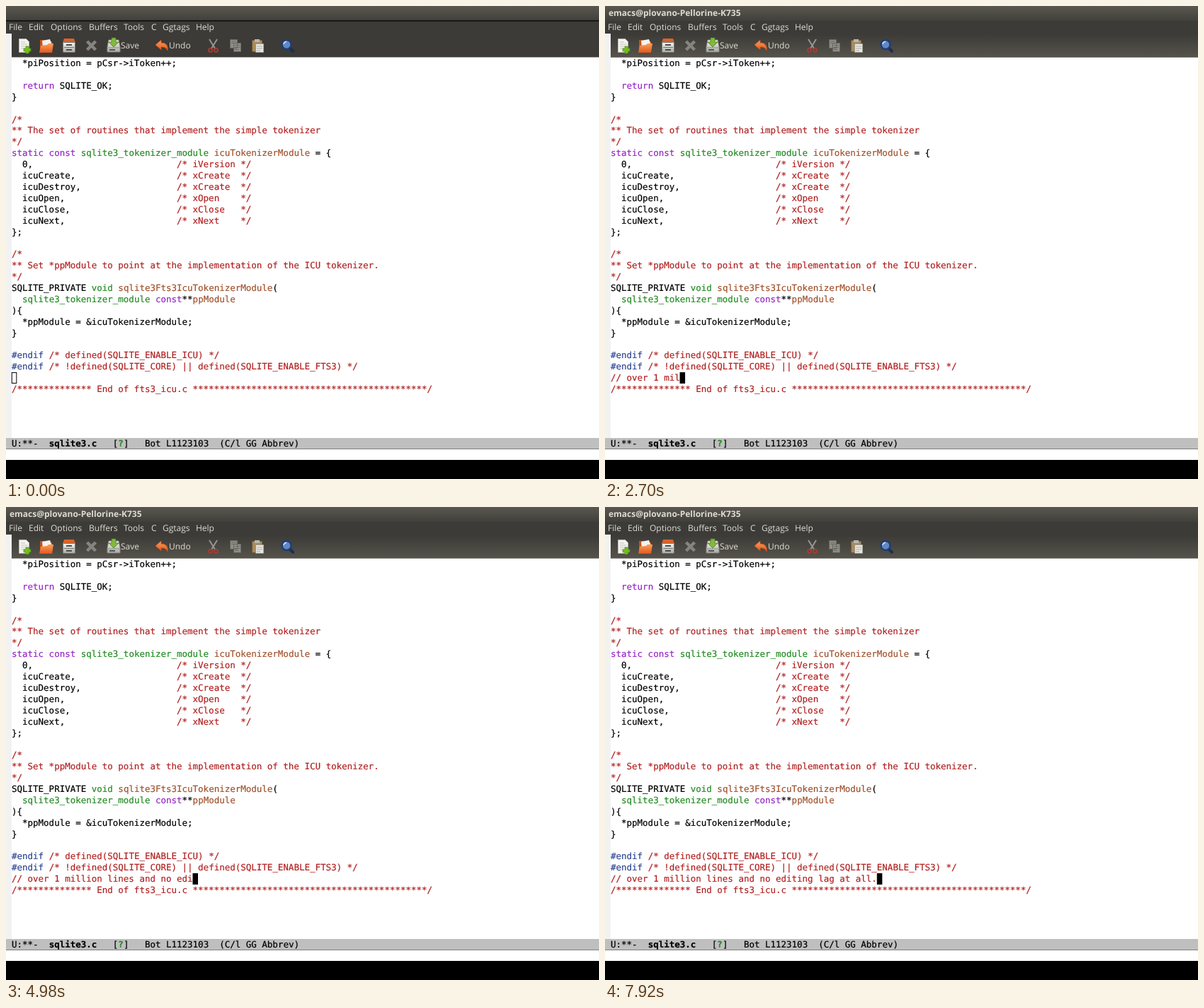
Write an HTML page that moves like this. It is 837 px wide and 669 px high and loops after 8000 ms.

```html
<!DOCTYPE html>
<html lang="en">
<head>
<meta charset="utf-8">
<title>Typing in an editor</title>
<style>
  html, body { margin: 0; width: 100%; height: 100%; overflow: hidden; background: #fff; }
  svg { display: block; width: 837px; height: 669px; }
  text { white-space: pre; text-rendering: geometricPrecision; }
  .ui { font: 12px "Open Sans", "Noto Sans", sans-serif; fill: #dfdbd2; }
  #title { font-weight: 700; }
  .code { font: 12.49px "DejaVu Sans Mono", monospace; }
  .code, .code tspan { fill: var(--ink, #000); stroke: var(--ink, #000); stroke-width: .2px; }
  .code .c { --ink: #b22222; }
  .code .k { --ink: #9628c4; }
  .code .t { --ink: #228b22; }
  .code .v { --ink: #a0522d; }
  .code .p { --ink: #2c4592; }
  .code .b { font-weight: bold; }
  .code .q { --ink: #228b22; font-weight: bold; }
</style>
</head>
<body>
<svg viewBox="0 0 837 669">
  <defs>
    <linearGradient id="panel" x2="0" y2="1"><stop stop-color="#5a5850"/><stop offset="1" stop-color="#403f3a"/></linearGradient>
    <linearGradient id="toolbar" x2="0" y2="1"><stop stop-color="#3c3b37"/><stop offset="1" stop-color="#55534b"/></linearGradient>
    <linearGradient id="orange" x2="0" y2="1"><stop stop-color="#f9a05c"/><stop offset="1" stop-color="#e4571b"/></linearGradient>
    <linearGradient id="metal" x2="0" y2="1"><stop stop-color="#f4f4f2"/><stop offset="1" stop-color="#a9a9a5"/></linearGradient>
  </defs>

  <rect width="837" height="72.500" fill="#3c3b37"/>
  <rect width="837" height="21" fill="url(#panel)"/>
  <rect id="shadow" y="20" width="837" height="2" fill="#171714"/>
  <rect id="focused" y="40" width="837" height="32.500" fill="url(#toolbar)"/>
  <text id="title" class="ui" x="5" y="14">emacs@plovano-Pellorine-K735</text>
  <g id="menu" class="ui"></g>
  <rect y="39" width="8" height="572" fill="#f2f2f2"/>

  <!-- new, open, drawer, close -->
  <path d="M18.500 46.500h10l4 4v15h-14z" fill="#f3f3ef" stroke="#b5b5ae"/>
  <path d="M21 51h6m-6 3h9m-9 3h9m-9 3h6" stroke="#c6c6c0"/>
  <path d="M28 57h4v3h3v4h-3v3h-4v-3h-3v-4h3z" fill="#73c01e" stroke="#4e8c10" stroke-width=".7"/>
  <path d="M48 65V48h7l2 2h8v15z" fill="#c8501c"/>
  <path d="M51 49l11-2 3 8-13 4z" fill="#f5f2ec"/>
  <path d="M47 66l2-10 9-1 2-2h7l-2 13z" fill="url(#orange)"/>
  <path d="M82 46h14l2 6H80z" fill="#d9632b"/>
  <rect x="80.500" y="51.500" width="17" height="14" rx="1" fill="url(#metal)" stroke="#777771"/>
  <path d="M82 58.500h14" stroke="#777771"/>
  <path d="M85 55h8m-8 7h8" stroke="#4b4b47" stroke-width="2"/>
  <path d="M114.500 50l12 12m0-12l-12 12" stroke="#85847e" stroke-width="4.500"/>

  <!-- save, undo -->
  <path d="M145 48h14l2 10v7h-18v-7z" fill="url(#metal)" stroke="#86867f"/>
  <path d="M144 59h16" stroke="#8b8b85"/>
  <path d="M146 62h8" stroke="#55554f" stroke-width="2"/>
  <path d="M149 45h6v6h4l-7 7-7-7h4z" fill="#82b93c" stroke="#4f7d1b" stroke-width=".8"/>
  <path d="M211 55l8-7v4c7 0 10 4 9 11-2-4-4-5-9-5v4z" fill="url(#orange)" stroke="#c94e18" stroke-width=".8"/>

  <!-- cut, copy, paste, search -->
  <path d="M287 47l8 13m3-13l-8 13" stroke="#96958f" stroke-width="2"/>
  <g fill="none" stroke="#a83a32" stroke-width="2"><circle cx="288.500" cy="62.500" r="2.500"/><circle cx="296.500" cy="62.500" r="2.500"/></g>
  <path d="M316.500 47.500h10v12h-10zM321.500 52.500h10v12h-10z" fill="#8e8d86" stroke="#66655f"/>
  <path d="M318 50h7m-7 2.500h3m2 3h7m-7 3h7m-7 3h5" stroke="#6d6c66"/>
  <rect x="347.500" y="48.500" width="14" height="16" rx="1" fill="#a88a5c" stroke="#76613f"/>
  <path d="M351 47h7v4h-7z" fill="#b8b7b0"/>
  <path d="M352.500 53.500h11v12h-11z" fill="#e8e7e1" stroke="#9b9a93"/>
  <path d="M354 57h8m-8 3h8m-8 3h5" stroke="#aaa9a2"/>
  <path d="M400 59l5 5" stroke="#1f2f50" stroke-width="4" stroke-linecap="round"/>
  <circle cx="396" cy="54.500" r="6.500" fill="#5f88c4" stroke="#213c74" stroke-width="2.500"/>
  <path d="M392 54a4 4 0 0 1 4-3.500" fill="none" stroke="#dce9fb" stroke-width="1.500"/>

  <g id="code" class="code"></g>
  <text id="typed" class="code" x="8" y="530.200"></text>
  <rect id="cursor" y="518" height="16"/>

  <rect y="611" width="837" height="16" fill="#bfbfbf"/>
  <path d="M0 626.500h837" stroke="#808080"/>
  <g id="status" class="code"></g>
  <rect y="642" width="837" height="27"/>
</svg>
<script>
const $ = id => document.getElementById(id);
const COLUMN = 7.52, ROW = 15.9, LEFT = 8, LOOP = 8000;

function addText(parent, x, y, text) {
  const node = document.createElementNS("http://www.w3.org/2000/svg", "text");
  node.setAttribute("x", x);
  node.setAttribute("y", y);
  // Odd pieces between tildes start with a colour class letter.
  text.split("~").forEach((piece, i) => {
    const span = document.createElementNS("http://www.w3.org/2000/svg", "tspan");
    if (i % 2) span.setAttribute("class", piece[0]);
    span.textContent = i % 2 ? piece.slice(1) : piece;
    node.append(span);
  });
  parent.append(node);
}

const field = (name, label) =>
  ("  " + name + ",").padEnd(31) + `~c/* ${label.padEnd(8)} */~`;

const lines = [
  "  *piPosition = pCsr->iToken++;",
  "",
  "  ~kreturn~ SQLITE_OK;",
  "}",
  "",
  "~c/*~",
  "~c** The set of routines that implement the simple tokenizer~",
  "~c*/~",
  "~kstatic const~ ~tsqlite3_tokenizer_module~ ~vicuTokenizerModule~ = {",
  field("0", "iVersion"),
  field("icuCreate", "xCreate"),
  field("icuDestroy", "xCreate"),
  field("icuOpen", "xOpen"),
  field("icuClose", "xClose"),
  field("icuNext", "xNext"),
  "};",
  "",
  "~c/*~",
  "~c** Set *ppModule to point at the implementation of the ICU tokenizer.~",
  "~c*/~",
  "SQLITE_PRIVATE ~tvoid~ ~vsqlite3Fts3IcuTokenizerModule~(",
  "  ~tsqlite3_tokenizer_module~ ~kconst~**~vppModule~",
  "){",
  "  *ppModule = &icuTokenizerModule;",
  "}",
  "",
  "~p#endif~ ~c/* defined(SQLITE_ENABLE_ICU) */~",
  "~p#endif~ ~c/* !defined(SQLITE_CORE) || defined(SQLITE_ENABLE_FTS3) */~",
  "",
  `~c/${"*".repeat(14)} End of fts3_icu.c ${"*".repeat(44)}/~`
];
lines.forEach((line, i) => addText($("code"), LEFT, 85 + i * ROW, line));
addText($("status"), LEFT, 623, "U:**-  ~bsqlite3.c~   [~q?~]   Bot L1123103  (C/l GG Abbrev)");

const menu = { File: 4, Edit: 32, Options: 63, Buffers: 117, Tools: 166, C: 205, Ggtags: 221, Help: 268 };
for (const [label, x] of Object.entries(menu)) addText($("menu"), x, 34, label);
addText($("menu"), 162, 60, "Save");
addText($("menu"), 230, 60, "Undo");

// Bursts of key presses: first time, last time, number of keys.
const bursts = [
  [970, 1150, 2], [1290, 1490, 3], [1630, 1940, 4], [2120, 2120, 1],
  [2400, 2510, 2], [2700, 2870, 2], [3050, 3750, 10], [3940, 4060, 2],
  [4144, 4480, 5], [4670, 4840, 2], [4980, 5170, 2], [5390, 5830, 6],
  [6000, 6060, 2], [6163, 6680, 6], [6910, 6910, 1]
];
const keyTimes = bursts.flatMap(([first, last, count]) =>
  Array.from({ length: count }, (_, i) => first + (last - first) * i / Math.max(1, count - 1)));
const comment = "// over 1 million lines and no editing lag at all.";

const show = (id, visible) => { $(id).style.display = visible ? "" : "none"; };

function draw(t) {
  const focused = t >= 460;
  const count = keyTimes.filter(time => t >= time - 0.5).length;

  show("shadow", !focused);
  show("focused", focused);
  show("title", t >= 520);
  show("cursor", t < 7410 || t >= 7920);

  $("typed").textContent = comment.slice(0, count);
  $("typed").style.setProperty("--ink", count > 1 ? "#b22222" : "#000");

  const cursor = $("cursor");
  const inset = focused ? 0 : 0.5;
  cursor.setAttribute("x", LEFT + count * COLUMN - 0.2 + inset);
  cursor.setAttribute("y", 518 + inset);
  cursor.setAttribute("width", COLUMN - 2 * inset);
  cursor.setAttribute("height", 16 - 2 * inset);
  cursor.setAttribute("fill", focused ? "#000" : "none");
  cursor.setAttribute("stroke", focused ? "none" : "#000");
}

const start = performance.now();
function tick() {
  draw((performance.now() - start) % LOOP);
  requestAnimationFrame(tick);
}
tick();
</script>
</body>
</html>
```
